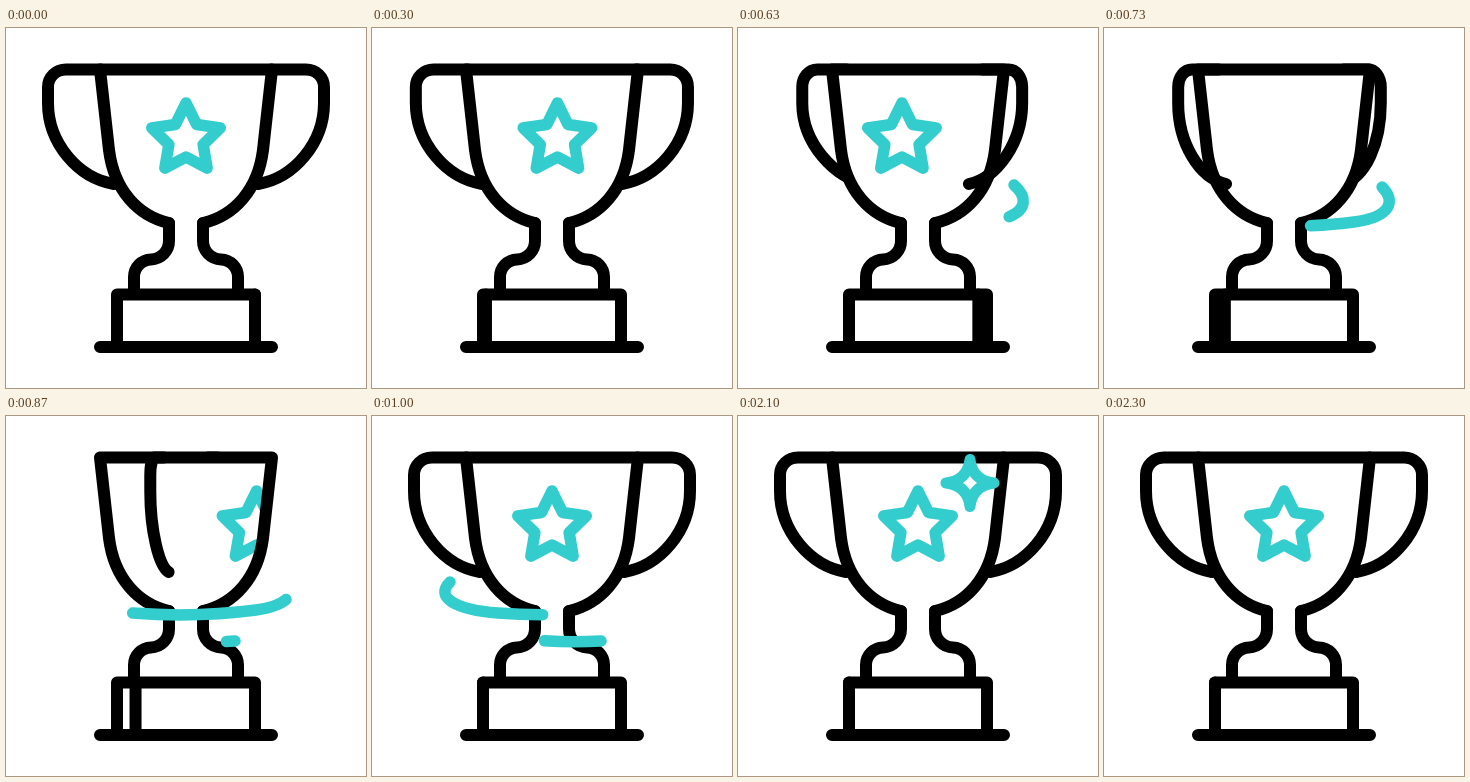
Recreate the animation shown at these times as an HTML page. Size 360 px wide and 360 px high, loop 2.5 s.

```html
<!DOCTYPE html>
<html lang="en">
<head>
<meta charset="utf-8">
<title>Trophy</title>
<style>
  html, body { margin: 0; width: 100%; height: 100%; overflow: hidden; background: #fff; }
  svg { display: block; width: 100vw; height: 100vh; }
  path { fill: none; stroke: #000; stroke-width: 12; stroke-linecap: round; stroke-linejoin: round; }
  .teal { stroke: #33cdce; stroke-width: 11.5; }
</style>
</head>
<body>
<svg viewBox="0 0 360 360">
  <clipPath id="inside">
    <path d="M94 41.5H266L257 122C252 162 228 188 197 195H163C132 188 108 162 103 122Z"/>
  </clipPath>
  <path id="back"/>
  <g clip-path="url(#inside)">
    <rect width="360" height="360" fill="#fff"/>
    <path id="star" class="teal"/>
  </g>
  <path d="M163 195C132 188 108 162 103 122L94 41.5H266L257 122C252 162 228 188 197 195"/>
  <path d="M163 195V213A18.5 18.5 0 0 1 145 231.5A17.5 17.5 0 0 0 128 249V266M197 195V213A18.5 18.5 0 0 0 215 231.5A17.5 17.5 0 0 1 232 249V266"/>
  <path d="M111 319V266.5H249V319M94 319H266"/>
  <path id="edge"/>
  <path id="front"/>
  <path id="upper" class="teal" pathLength="100" d="M276 157C293 172 288 189 250 194S165 200 126 197C85 194 62 182 78 166"/>
  <path id="lower" class="teal" pathLength="100" d="M229 225Q180 228 135 220"/>
  <path id="spark" class="teal" d="M0-25Q2.5-2.5 25.5 0Q2.5 2.5 0 25Q-2.5 2.5-25.5 0Q-2.5-2.5 0-25Z"/>
</svg>
<script>
const $ = id => document.getElementById(id);
const LOOP = 2500, MID = 180;
const cos = deg => Math.cos(deg * Math.PI / 180);
const sin = deg => Math.sin(deg * Math.PI / 180);

// Smooth curve through [tick, value] keys; flat at ends and turning points.
function curve(...keys) {
  const rate = (a, b) => (b[1] - a[1]) / (b[0] - a[0]);
  const slopes = keys.map((k, i) => {
    const a = keys[i - 1], b = keys[i + 1];
    return a && b && rate(a, k) * rate(k, b) > 0 ? rate(a, b) : 0;
  });
  return x => {
    if (x <= keys[0][0]) return keys[0][1];
    const i = keys.findIndex(k => k[0] > x) - 1;
    if (i < 0) return keys[keys.length - 1][1];
    const [x0, y0] = keys[i], [x1, y1] = keys[i + 1];
    const w = x1 - x0, t = (x - x0) / w, u = 1 - t;
    return u * u * (1 + 2 * t) * y0 + t * t * (3 - 2 * t) * y1
      + w * t * u * (u * slopes[i] - t * slopes[i + 1]);
  };
}

// Each part winds up to the right, then makes one full turn to the left.
const spin = (windup, a, b) => curve([7, 0], [13, windup], [19, a], [26, b], [30, -360]);
const leftTurn = spin(36, -33, -285);
const rightTurn = spin(38, -41, -285);
const jointTurn = spin(55, -45, -284);
const edgeTurn = spin(65, -29, -317);
const starTurn = spin(10, -7.7, -324);

const upperHead = curve([18, 0], [19, 16], [26, 72], [30, 100]);
const upperTail = curve([19, 0], [26, 12], [30, 55], [34, 100]);
const lowerHead = curve([25, 0], [26, 9], [30, 60], [35, 100]);
const lowerTail = curve([30, 0], [38, 100]);
const sparkSize = curve([33, 0], [41, 1], [62, 1], [69, 0]);

const starPoints = Array.from({ length: 10 }, (_, i) => {
  const r = i % 2 ? 18 : 36;
  return [r * sin(i * 36), 111 - r * cos(i * 36)];
});
$('star').setAttribute('d', 'M' + starPoints.join('L') + 'Z');

function handle(side, turn, joint) {
  const p = (x, y, a = turn) => `${MID + side * x * cos(a)} ${y} `;
  return 'M' + p(85, 41.5) + 'L' + p(120, 41.5) + 'C' + p(130, 41.5) + p(138, 49) + p(138, 59)
    + 'L' + p(138, 75) + 'C' + p(138, 115) + p(108, 150, (turn + joint) / 2) + p(72, 156, joint);
}

function trim(id, head, tail) {
  const style = $(id).style;
  style.display = head > tail ? '' : 'none';
  style.strokeDasharray = `${head - tail} 300`;
  style.strokeDashoffset = -tail;
}

function draw(tick) {
  const left = leftTurn(tick), joint = jointTurn(tick);
  const paths = [handle(-1, left, joint), handle(1, rightTurn(tick), joint)];
  if (sin(left) <= 0) paths.reverse();
  $('front').setAttribute('d', paths[0]);
  $('back').setAttribute('d', paths[1]);

  const edge = edgeTurn(tick), edgeSide = sin(edge) > 0 ? -1 : 1;
  $('edge').setAttribute('d', `M${MID + edgeSide * 69 * cos(edge)} 266.5V319`);

  const face = starTurn(tick);
  $('star').setAttribute('transform', `translate(${MID + 120 * sin(face)})`);
  $('star').style.display = cos(face) > 0 ? '' : 'none';

  trim('upper', upperHead(tick), upperTail(tick));
  trim('lower', lowerHead(tick), lowerTail(tick));

  const size = sparkSize(tick);
  $('spark').setAttribute('transform', `translate(232 67) scale(${size})`);
  $('spark').style.display = size > 0 ? '' : 'none';
}

const start = performance.now();
function loop() {
  const time = (performance.now() - start) % LOOP;
  draw(Math.floor(time * 0.03 + 0.15)); // 30 ticks per second
  requestAnimationFrame(loop);
}
loop();
</script>
</body>
</html>
```
